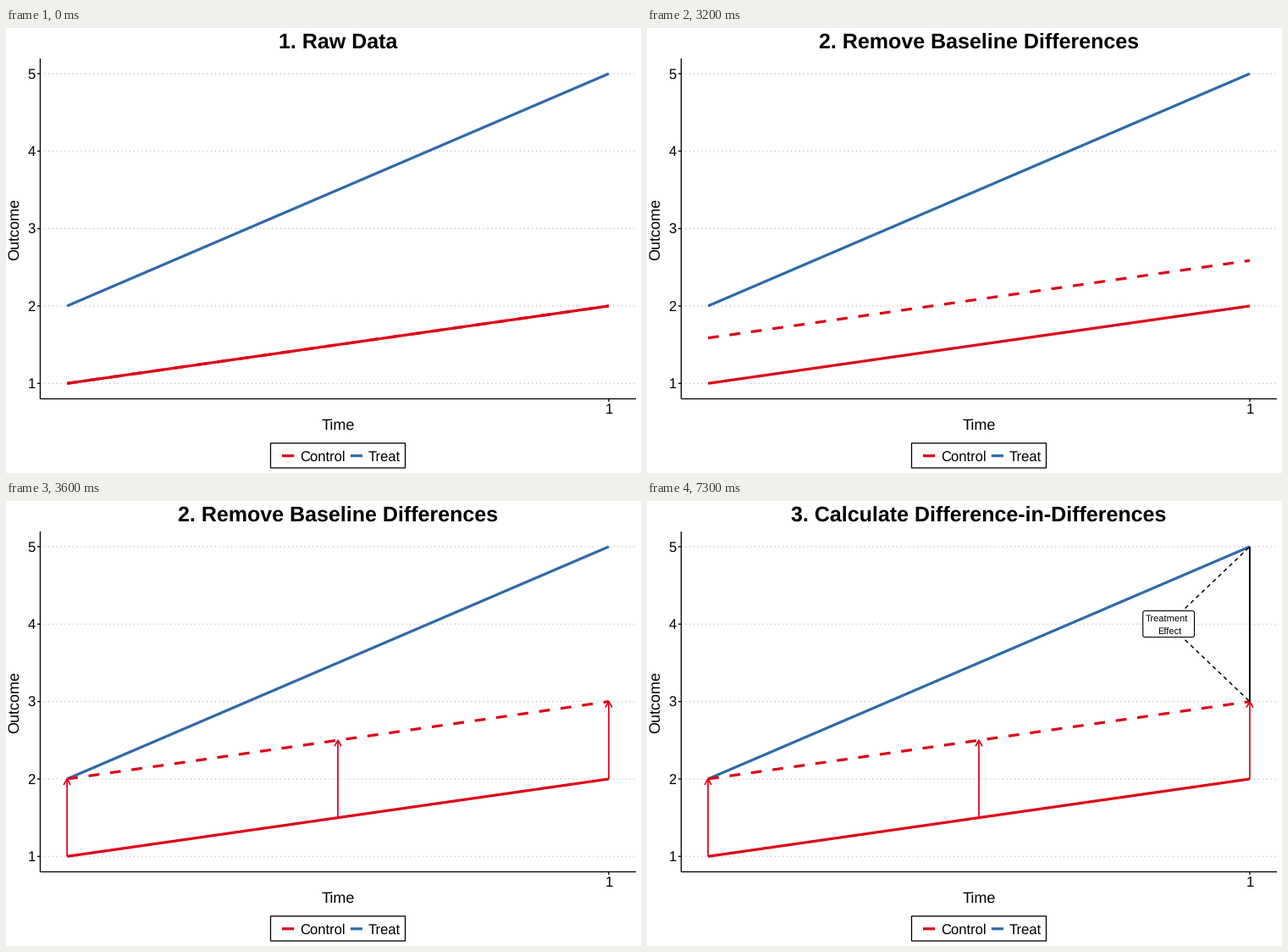
Write a matplotlib script that moves like this. It is 750 px wide and 525 px high and loops after 10 s.

```python
import math

import matplotlib.pyplot as plt
from matplotlib.animation import FuncAnimation
from matplotlib.patches import FancyBboxPatch, Rectangle

W, H, DPI = 750, 525, 100
STEP = 100
FRAMES = 100
RED, BLUE, GRID = "#DC0019", "#2D6AAB", "#BEBEBE"
LEFT, MID, RIGHT = 72.1, 392, 711.9
AXIS_X, AXIS_Y, EDGE = 40.4, 437.5, 744

TITLES = ["1. Raw Data", "2. Remove Baseline Differences",
          "3. Calculate Difference-in-Differences"]
SHIFT_START, SHIFT_STEPS = 28, 9
DIFF_START, EFFECT_START = 64, 72

plt.rcParams.update({
    "font.family": "Liberation Sans",
    "text.hinting": "none",
    "lines.scale_dashes": False,
    "toolbar": "None",
})

fig = plt.figure(figsize=(W / DPI, H / DPI), dpi=DPI, facecolor="white")
ax = fig.add_axes([0, 0, 1, 1])
ax.set_xlim(0, W)
ax.set_ylim(H, 0)
ax.axis("off")


def pt(px):
    return px * 72 / DPI


def ypos(value):
    return 419.3 - 91.35 * (value - 1)


def line(xs, ys, color="black", width=1.3, dash=None, z=2):
    style = "-" if dash is None else (0, tuple(pt(d) for d in dash))
    return ax.plot(xs, ys, color=color, lw=pt(width), ls=style, zorder=z,
                   solid_capstyle="butt", dash_capstyle="butt",
                   solid_joinstyle="round", snap=False)[0]


def label(x, y, text, size=12, ha="center", **kw):
    return ax.text(x, y, text, fontsize=size, ha=ha, va="baseline", **kw)


def arrow(x, start, end):
    y0, y1 = ypos(start), ypos(end)
    dx, dy = 4, 7
    return [line([x, x], [y0, y1], RED, 1.7, z=6),
            line([x - dx, x, x + dx], [y1 + dy, y1, y1 + dy], RED, 1.7, z=6)]


def draw_axes():
    for v in range(1, 6):
        y = ypos(v)
        line([AXIS_X, EDGE], [y, y], GRID, 1.2, (1.2, 3.6), z=1)
        line([37, AXIS_X], [y, y])
        label(34.8, round(y) + 6, str(v), ha="right")
    line([AXIS_X, AXIS_X], [36, AXIS_Y])
    line([AXIS_X, EDGE], [AXIS_Y, AXIS_Y])
    line([RIGHT, RIGHT], [AXIS_Y, 441])
    label(RIGHT, 455, "1")
    label(MID, 474, "Time", 13)
    ax.text(19, 237.5, "Outcome", fontsize=13, rotation=90,
            ha="right", va="center")


def draw_legend():
    ax.add_patch(Rectangle((312.5, 489.8), 159, 29.2, fc="white", ec="black",
                           lw=pt(1.3), snap=False))
    for x, name, color in ((326, "Control", RED), (406.8, "Treat", BLUE)):
        line([x, x + 14.2], [504.7, 504.7], color, 3.2)
        label(x + 21, 511, name, ha="left")


def draw_effect():
    x, y = 616, ypos(4)
    top, low = ypos(5), ypos(3)
    parts = [line([RIGHT, RIGHT], [top, low], width=1.9, z=7)]
    parts += [line([x, RIGHT], [y, end], width=1.5, dash=(4.8, 4.2), z=7)
              for end in (top, low)]
    box = FancyBboxPatch((585.7, 129.6), 60.8, 31,
                         boxstyle="round,pad=0,rounding_size=2.5",
                         fc="white", ec="black", lw=pt(1.1), zorder=8,
                         snap=False)
    parts.append(ax.add_patch(box))
    parts.append(label(614.4, 142, "Treatment", 8, zorder=9))
    parts.append(label(617.4, 158, "Effect", 8, zorder=9))
    return parts


draw_axes()
draw_legend()
title = label(MID, 24, "", 18, weight="bold")
line([LEFT, RIGHT], [ypos(1), ypos(2)], RED, 3.2, z=3)
line([LEFT, RIGHT], [ypos(2), ypos(5)], BLUE, 3.2, z=4)
shifted = line([LEFT, RIGHT], [ypos(1), ypos(2)], RED, 3.2, (12.8, 12.8), z=5)
arrows = [part for x, v in ((LEFT, 1), (MID, 1.5), (RIGHT, 2))
          for part in arrow(x, v, v + 1)]
effect = draw_effect()


def show(parts, visible):
    for part in parts:
        part.set_visible(visible)


def update(i):
    title.set_text(TITLES[(i >= SHIFT_START) + (i >= DIFF_START)])
    t = min(max((i - SHIFT_START + 1) / SHIFT_STEPS, 0), 1)
    rise = (1 - math.cos(math.pi * t)) / 2
    shifted.set_ydata([ypos(1 + rise), ypos(2 + rise)])
    show(arrows, t >= 1)
    show(effect, i >= EFFECT_START)
    return [title, shifted, *arrows, *effect]


anim = FuncAnimation(fig, update, frames=FRAMES, interval=STEP,
                     repeat=True, repeat_delay=0, blit=False)
plt.show()
```
